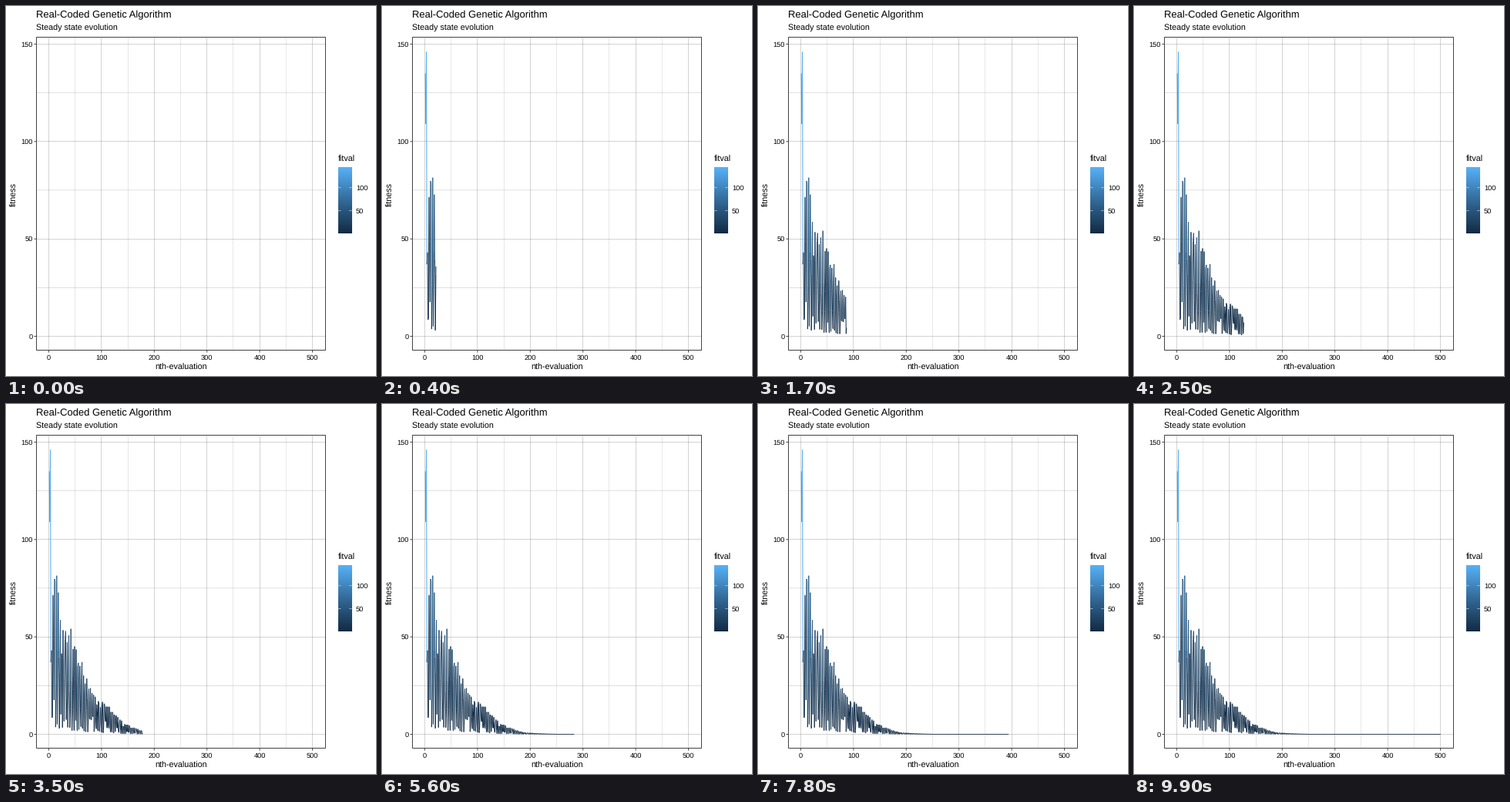
Animation of 480 by 480 pixels, one loop 10 s. Source, as a matplotlib script:

```python
import numpy as np
import matplotlib.pyplot as plt
from matplotlib.animation import FuncAnimation
from matplotlib.collections import LineCollection
from matplotlib.colors import LinearSegmentedColormap, Normalize
from matplotlib.patches import Rectangle

SIZE, DPI = 480, 72  # at 72 dpi one point is one pixel
FRAMES, INTERVAL = 100, 100
N = 500
LEFT, RIGHT, TOP, BOTTOM = 39.5, 414.5, 40.5, 446.5
DARK = "#444444"

plt.rcParams.update({"font.family": "Liberation Sans",
                     "text.hinting": "none", "path.snap": False})


def fitness():
    """A few wild first tries, then a jittery swing under a falling ceiling."""
    rng = np.random.default_rng(7)
    start = [135, 109, 146, 37, 43, 8.5, 9]
    n = np.arange(len(start) + 1, N + 1)
    top = np.interp(n, [10, 16, 20, 51, 83, 113, 145, 166, 187, 225, 250],
                    [100, 92, 66, 50, 25, 15, 6, 3.4, 1.1, 0.3, 0])
    phase = np.cumsum(rng.uniform(1, 2.8, n.size))
    swing = 0.5 - 0.5 * np.cos(phase)
    peak = rng.uniform(0.85, 1, n.size)
    return np.concatenate([start, top * peak * (0.04 + 0.96 * swing)])


def px(n):
    return 55.5 + 0.684 * np.asarray(n)


def py(v):
    return 428.5 - 2.527 * np.asarray(v)


fig = plt.figure(figsize=(SIZE / DPI, SIZE / DPI), dpi=DPI, facecolor="white")
ax = fig.add_axes([0, 0, 1, 1])
ax.axis("off")


def rule(x, y, color, width=1.0, z=1):
    ax.plot(x, y, color=color, lw=width, solid_capstyle="butt", zorder=z)


def label(x, y, text, size=10.7, **kw):
    ax.text(x, y, text, fontsize=size, color="black", va="baseline", **kw)


# Grid, ticks and tick labels
for n in range(0, N + 1, 50):
    major = n % 100 == 0
    x = float(px(n))
    rule([x, x], [TOP, BOTTOM], "black", 0.17 if major else 0.09)
    if major:
        rule([x, x], [BOTTOM, BOTTOM + 3], DARK)
        label(x, 459, str(n), 9.2, ha="center")
for v in range(0, 151, 25):
    major = v % 50 == 0
    y = float(py(v))
    rule([LEFT, RIGHT], [y, y], "black", 0.17 if major else 0.12)
    if major:
        rule([LEFT - 3, LEFT], [y, y], DARK)
        label(34.5, y + 3.2, str(v), 9.2, ha="right")
ax.add_patch(Rectangle((LEFT, TOP), RIGHT - LEFT, BOTTOM - TOP, fill=False,
                       ec=DARK, lw=1, zorder=4))

label(39.3, 15.3, "Real-Coded Genetic Algorithm", 13)
label(39.3, 32, "Steady state evolution")
label(227, 471.5, "nth-evaluation", ha="center")
label(14, 244, "fitness", ha="center", rotation=90, rotation_mode="anchor")

# Colour bar
values = fitness()
cmap = LinearSegmentedColormap.from_list(
    "blues", ["#132B43", "#336A98", "#56B1F7"])
norm = Normalize(values.min(), values.max())
label(431, 202, "fitval")
ax.imshow(np.linspace(1, 0, 256)[:, None], cmap=cmap, aspect="auto",
          extent=(431, 449, 295, 209), interpolation="bilinear", zorder=2)
for v in (50, 100):
    y = 295 - 86.4 * norm(v)
    for x in (431, 445.2):
        rule([x, x + 3.5], [y, y], "white", 0.5, 3)
    label(454, y + 3.2, str(v), 9.2)
ax.set_xlim(0, SIZE)
ax.set_ylim(SIZE, 0)

# Each segment takes the colour of its starting value
steps = np.arange(1, N + 1)
colors = cmap(norm(values))
trace = LineCollection([], linewidths=1.07, capstyle="butt", zorder=3)
ax.add_collection(trace, autolim=False)


def update(i):
    head = 1 + (N - 1) * i / (FRAMES - 1)
    done = steps < head
    n = np.append(steps[done], head)
    v = np.append(values[done], np.interp(head, steps, values))
    pts = np.column_stack([px(n), py(v)])
    trace.set_segments(np.stack([pts[:-1], pts[1:]], axis=1))
    trace.set_color(colors[:len(pts) - 1])
    return [trace]


anim = FuncAnimation(fig, update, frames=FRAMES, interval=INTERVAL,
                     repeat=True, repeat_delay=0)
plt.show()
```
